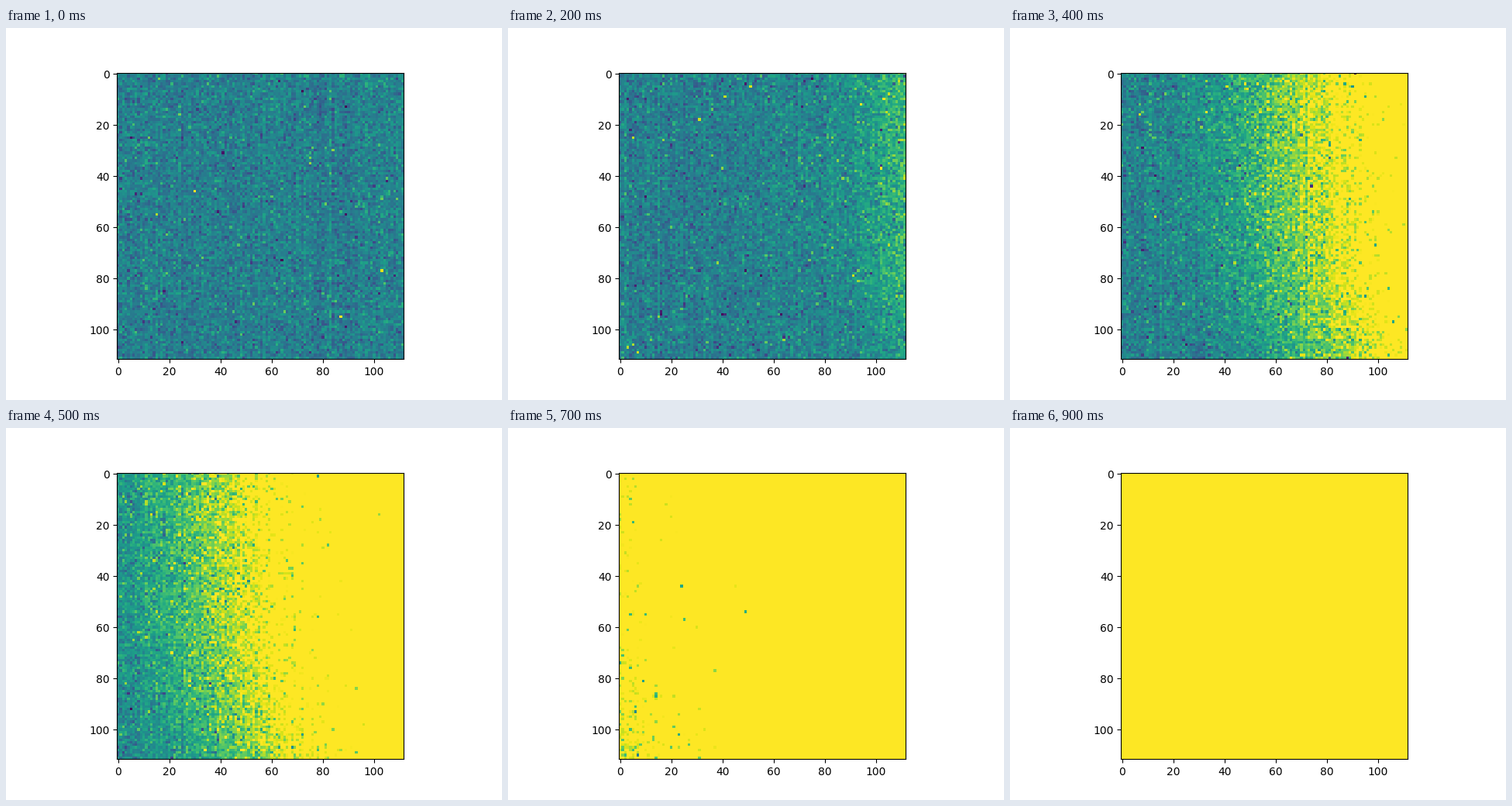
Write a matplotlib script that moves like this. It is 640 px wide and 480 px high and loops after 4.9 s.

```python
import numpy as np
import matplotlib.pyplot as plt
from matplotlib.animation import FuncAnimation

N = 112
STEP_MS = 100
FRAMES = 49
LAST = 9  # fully saturated from here on
BASE = 0.43
SLOPE = 0.0135  # brightness gained per column behind the front
SOFT = 15  # width of the front's knee, in columns

y, x = np.mgrid[:N, :N].astype(float)
v = y / (N - 1)
lag = 6 * v + 14 * v**4  # the front trails towards the bottom
glow = 1 + 0.15 * np.exp(-((y - 80) / 13) ** 2) / (1 + np.exp((98 - x) / 4))

rng = np.random.default_rng(4)
col_offset = rng.normal(0, 0.02, N)
col_gain = 1 + rng.normal(0, 0.03, N)


def exposure(step):
    """Noisy sensor image, brightening from the right until saturated."""
    if step >= LAST:
        return np.ones((N, N))
    front = 153 - 27 * step - 0.4 * step**2 + lag
    signal = SLOPE * SOFT * np.logaddexp(0, (x - front) / SOFT)
    signal *= glow * col_gain
    noise = np.random.default_rng(100 + step).standard_t(7, (N, N))
    spread = 0.072 * np.sqrt(1 + 3 * np.minimum(signal, 0.8))
    return np.clip(BASE + col_offset + signal + spread * noise, 0, 1)


fig, ax = plt.subplots(figsize=(6.4, 4.8), dpi=100)
image = ax.imshow(exposure(0), cmap="viridis", vmin=0, vmax=1)


def update(step):
    image.set_data(exposure(step))
    return (image,)


anim = FuncAnimation(fig, update, frames=FRAMES, interval=STEP_MS,
                     repeat=True, repeat_delay=0)
plt.show()
```
